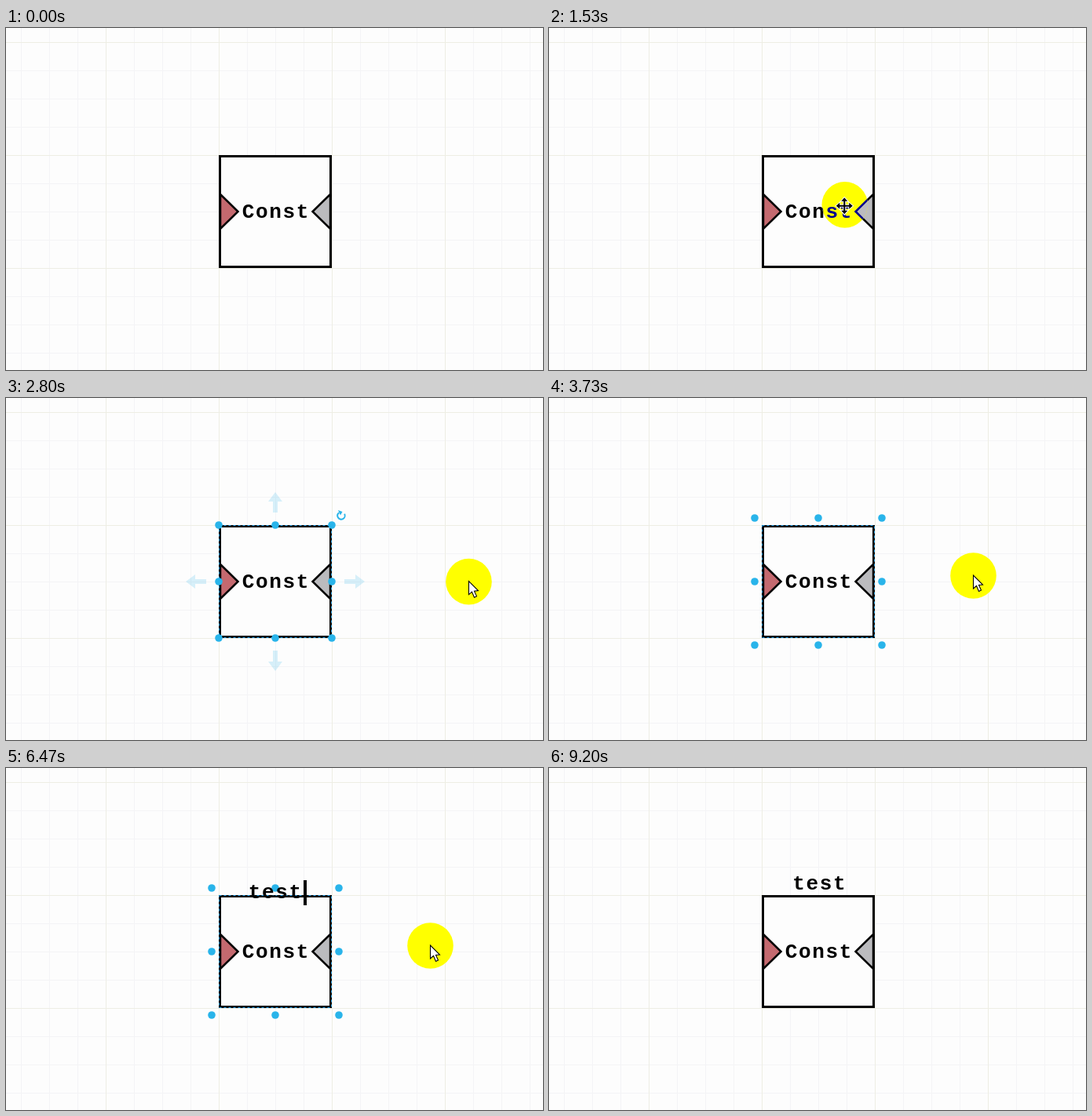
An HTML page with a canvas that plays this animation: 684x436 px, repeating every 9.86 s.

```html
<!DOCTYPE html>
<html lang="en">
<head>
<meta charset="utf-8">
<title>Labelling a block</title>
<style>
html, body { margin: 0; width: 100%; height: 100%; overflow: hidden; background: #fdfdfd; }
canvas { display: block; }
</style>
</head>
<body>
<canvas id="stage" width="684" height="436"></canvas>
<script>
const W = 684, H = 436, LOOP = 9860;
const ctx = document.getElementById('stage').getContext('2d');
const PAPER = '#fdfdfd', BLUE = '#29b4ea';
const SELECT = 1800, ARROWS = 2330, EDIT = 3200, COMMIT = 6970;
const KEYS = [4200, 4430, 4630, 4840];
const ADVANCE = 17.28;

// Pointer routes: [time, x, y]
const ENTER = [[800, 700, 296], [1030, 555, 234], [1380, 405, 224], [1770, 363, 228]];
const LEAVE_BOX = [[2570, 363, 228], [2850, 620, 234], [3150, 540, 226]];
const EXIT = [[8440, 540, 226], [8470, 536, 236], [8700, 514, 296], [8950, 566, 380], [9200, 656, 470]];

function along(route, t) {
  const last = route.length - 1;
  if (t <= route[0][0]) return route[0].slice(1);
  if (t >= route[last][0]) return route[last].slice(1);
  let i = 0;
  while (t >= route[i + 1][0]) i++;
  const a = route[i], b = route[i + 1], span = b[0] - a[0], u = (t - a[0]) / span;
  const slope = (k, axis) => {
    if (k === 0 || k === last) return 0;
    const p = route[k - 1], n = route[k + 1];
    return (n[axis] - p[axis]) / (n[0] - p[0]);
  };
  return [1, 2].map(axis =>
    a[axis] * (1 + 2 * u) * (1 - u) ** 2 + b[axis] * u * u * (3 - 2 * u) +
    span * u * (1 - u) * (slope(i, axis) * (1 - u) - slope(i + 1, axis) * u));
}

function pointerAt(t) {
  if (t < 800 || t >= 9200) return null;
  if (t < 2570) return along(ENTER, t);
  if (t < 8470) return along(LEAVE_BOX, t);
  return along(EXIT, t);
}

function poly(points, fill, stroke, width) {
  ctx.beginPath();
  points.forEach(([x, y]) => ctx.lineTo(x, y));
  ctx.closePath();
  if (fill) { ctx.fillStyle = fill; ctx.fill(); }
  if (stroke) { ctx.strokeStyle = stroke; ctx.lineWidth = width; ctx.stroke(); }
}

function disc(x, y, r, fill) {
  ctx.beginPath();
  ctx.arc(x, y, r, 0, Math.PI * 2);
  ctx.fillStyle = fill;
  ctx.fill();
}

function label(text, x, y, fill) {
  const size = 26, gap = ADVANCE - size * 0.6;
  ctx.font = `bold ${size}px "Liberation Mono", "Courier New", monospace`;
  ctx.letterSpacing = gap + 'px';
  ctx.textAlign = 'center';
  ctx.fillStyle = fill;
  ctx.fillText(text, x + gap / 2, y);
}

function grid() {
  ctx.fillStyle = PAPER;
  ctx.fillRect(0, 0, W, H);
  const lines = (step, color) => {
    ctx.fillStyle = color;
    for (let x = 127 % step; x < W; x += step) ctx.fillRect(x, 0, 1, H);
    for (let y = 18; y < H; y += step) ctx.fillRect(0, y, W, 1);
  };
  lines(36, '#f4f4f6');
  lines(144, '#eeeee4');
}

function block(ink) {
  ctx.lineJoin = 'miter';
  poly([[273, 212], [295.5, 234], [273, 256]], '#c4696f', ink, 2.5);
  poly([[413, 212], [390.5, 234], [413, 256]], '#bbbbbe', ink, 2.5);
  ctx.strokeStyle = ink;
  ctx.lineWidth = 3;
  ctx.strokeRect(272.5, 163.5, 141, 141);
  label('Const', 343, 242, ink);
}

function rotateIcon(x, y) {
  ctx.strokeStyle = BLUE;
  ctx.lineWidth = 2;
  ctx.beginPath();
  ctx.arc(x, y, 4.7, -0.5, Math.PI * 1.3);
  ctx.stroke();
  poly([[x - 4, y - 7], [x + 1.5, y - 5], [x - 1, y - 0.5]], BLUE);
}

function hoverArrows() {
  ctx.globalAlpha = 0.18;
  for (let i = 0; i < 4; i++) {
    ctx.save();
    ctx.translate(343, 234);
    ctx.rotate(i * Math.PI / 2);
    poly([[-3, -88], [3, -88], [3, -102], [9, -102], [0, -114], [-9, -102], [-3, -102]], BLUE);
    ctx.restore();
  }
  ctx.globalAlpha = 1;
}

function selection(t) {
  ctx.strokeStyle = '#1a96e0';
  ctx.lineWidth = 1;
  ctx.setLineDash([3, 3]);
  ctx.strokeRect(271.5, 162.5, 143, 143);
  ctx.setLineDash([]);
  const editing = t >= EDIT, reach = editing ? 81 : 72;
  for (let i = -1; i <= 1; i++)
    for (let j = -1; j <= 1; j++)
      if (i || j) disc(343 + i * reach, 234 + j * reach, 4.8, BLUE);
  if (!editing) rotateIcon(427, 150);
  if (t >= ARROWS && !editing) hoverArrows();
}

function caretOn(t) {
  if (t >= 6470) return true;
  const typed = KEYS.filter(k => t >= k).pop();
  const since = t - (typed || EDIT);
  return Math.floor(since / 530) % 2 === 0;
}

function editor(t) {
  const n = KEYS.filter(k => t >= k).length;
  label('test'.slice(0, n), 342.5, 166, '#000');
  if (caretOn(t)) {
    ctx.fillStyle = '#000';
    ctx.fillRect(Math.round(344.5 + n * ADVANCE / 2), 143, 4, 32);
  }
}

function arrowCursor(x, y) {
  const shape = [[0, 0], [0, 17], [4, 13.5], [7, 20.5], [10, 19], [7, 12.5], [12, 12]];
  poly(shape.map(([dx, dy]) => [x + dx + 0.5, y + dy]), '#fff', '#000', 1.1);
}

function moveCursor(x, y) {
  const arm = [[-1, -1], [-1, -6], [-4, -6], [0, -10.5], [4, -6], [1, -6], [1, -1]];
  const shape = [0, 1, 2, 3].flatMap(q => arm.map(([a, b]) => {
    for (let k = 0; k < q; k++) [a, b] = [-b, a];
    return [x + a, y + b];
  }));
  poly(shape, '#000', '#fff', 2);
  poly(shape, '#000');
}

function pointer(t) {
  const at = pointerAt(t);
  if (!at) return;
  const [x, y] = at;
  disc(x + 0.5, y + 0.5, 29.3, '#ff0');
  ctx.save();
  ctx.clip();
  // Black lines show as navy through the highlight
  block('#00008c');
  ctx.restore();
  const inside = x > 271 && x < 415 && y > 162 && y < 306;
  if (inside) moveCursor(x, y + 2);
  else arrowCursor(x, y);
}

function draw(t) {
  grid();
  ctx.fillStyle = PAPER;
  ctx.fillRect(271, 162, 144, 144);
  block('#000');
  if (t >= SELECT && t < COMMIT) selection(t);
  if (t >= EDIT && t < COMMIT) editor(t);
  if (t >= COMMIT) label('test', 344, 155, '#000');
  pointer(t);
}

const start = performance.now();
function tick() {
  draw((performance.now() - start) % LOOP);
  requestAnimationFrame(tick);
}
tick();
</script>
</body>
</html>
```
